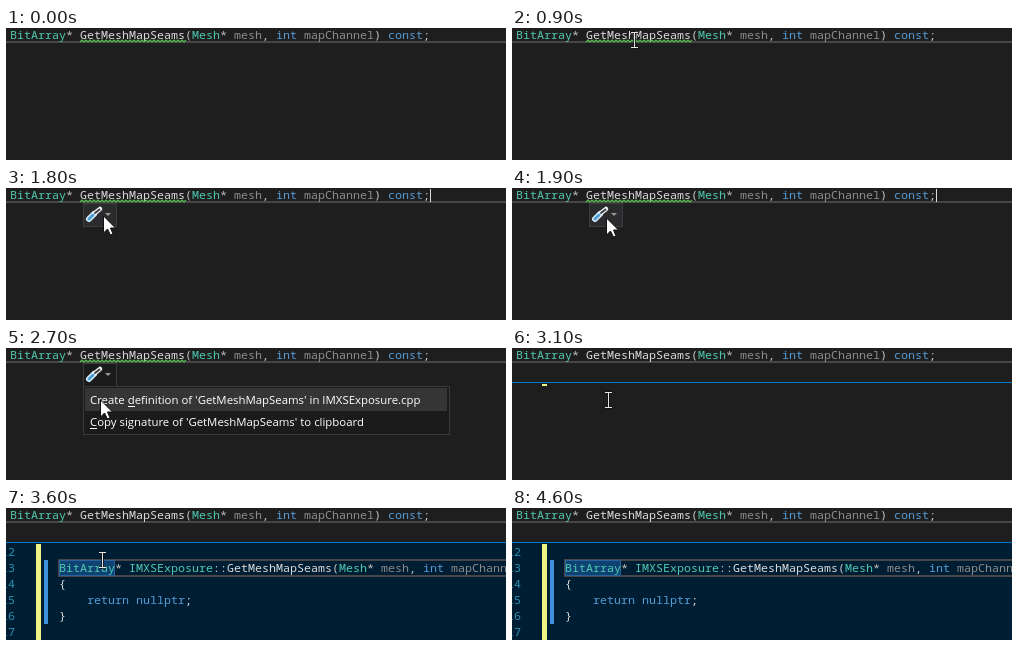
An HTML page with a canvas for the animation above (4.8 s loop, 500 by 132 pixels).

```html
<!DOCTYPE html>
<html lang="en">
<head>
<meta charset="utf-8">
<title>Create definition</title>
<style>
  html, body { margin: 0; width: 100%; height: 100%; overflow: hidden; background: #1e1e1e; }
  canvas { display: block; }
</style>
</head>
<body>
<canvas id="stage" width="500" height="132"></canvas>
<script>
const ctx = document.getElementById('stage').getContext('2d');
const LOOP = 4800, STEP = 100, CHAR = 7;
const CODE = '11.667px "Noto Sans Mono", "DejaVu Sans Mono", monospace';
const UI = '11.4px "Open Sans", "Noto Sans", sans-serif';
const C = {
  bg: '#1e1e1e', peek: '#001e33', type: '#4ec9b0', key: '#569cd6', name: '#dcdcdc',
  param: '#8c8c8c', punct: '#c4c4c4', border: '#464646', link: '#0097fb', text: '#ffffff',
  blue: '#007acc', yellow: '#eff284', number: '#2b91af', green: '#57c04f'
};

const SIGNATURE = [
  ['GetMeshMapSeams', C.name], ['(', C.punct], ['Mesh', C.type], ['* ', C.punct],
  ['mesh', C.param], [', ', C.punct], ['int ', C.key], ['mapChannel', C.param],
  [') ', C.punct], ['const', C.key], [';', C.punct]
];
const DECLARATION = [['BitArray', C.type], ['* ', C.punct], ...SIGNATURE];
const DEFINITION = [
  ['BitArray', C.type], ['* ', C.punct], ['IMXSExposure', C.type], ['::', C.punct], ...SIGNATURE
];
const TIP_TITLE = [
  ['BitArray ', C.type], ['*', C.punct], ['IMXSExposure', C.type], ['::', C.punct],
  ['GetMeshMapSeams', C.name], ['(', C.punct], ['Mesh ', C.type], ['*', C.punct],
  ['mesh', C.param], [', ', C.punct], ['int ', C.key], ['mapChannel', C.param]
];

const lerp = (a, b, p) => a + (b - a) * p;
const clamp = v => Math.min(1, Math.max(0, v));
const smooth = p => p * p * (3 - 2 * p);
const within = (t, a, b) => t >= a && t < b;

function rect(x, y, w, h, color) {
  ctx.fillStyle = color;
  ctx.fillRect(x, y, w, h);
}

function frame(x, y, w, h, fill, line, size = 1) {
  rect(x, y, w, h, line);
  rect(x + size, y + size, w - 2 * size, h - 2 * size, fill);
}

function stroke(points, color, width) {
  ctx.beginPath();
  points.forEach(([x, y]) => ctx.lineTo(x, y));
  ctx.strokeStyle = color;
  ctx.lineWidth = width;
  ctx.stroke();
}

function polygon(points, color) {
  ctx.beginPath();
  points.forEach(([x, y]) => ctx.lineTo(x, y));
  ctx.closePath();
  ctx.fillStyle = color;
  ctx.fill();
}

function code(tokens, x, y) {
  ctx.font = CODE;
  for (const [str, color] of tokens) {
    ctx.fillStyle = color;
    ctx.fillText(str, x, y);
    x += str.length * CHAR;
  }
}

function label(tokens, x, y) {
  ctx.font = UI;
  for (const [str, color] of tokens) {
    ctx.fillStyle = color;
    ctx.fillText(str, x, y);
    x += ctx.measureText(str).width;
  }
}

function squiggle(x1, x2, y) {
  const points = [];
  for (let x = x1, up = 0; x <= x2; x += 2, up ^= 1) points.push([x, y - up * 2]);
  stroke(points, C.green, 1.2);
}

function editor(t) {
  rect(0, 0, 500, 132, C.bg);
  rect(0, 13, 500, 2, C.border);
  code(DECLARATION, 4, 11);
  if (t < 3000) squiggle(74, 180, 14);
  if (within(t, 400, 900) || within(t, 1500, 2000)) rect(424, 1, 1, 13, '#dcdcdc');
}

function quickAction(open) {
  frame(77, 15, 34, 24, open ? '#1b1b1c' : '#2b2b2d', '#3c3c40');
  ctx.lineCap = 'round';
  stroke([[83, 31], [88, 26]], '#d9ecfb', 6);
  stroke([[89, 25], [94, 21]], '#f1f1f1', 4.5);
  stroke([[83, 31], [87, 27]], '#4f9fd8', 3);
  stroke([[89, 25], [93.5, 21.5]], '#3b4248', 2);
  ctx.lineCap = 'butt';
  polygon([[99, 25], [105, 25], [102, 28]], '#999999');
}

function cube(x, y) {
  const hex = [[0, -6], [5, -3], [5, 3], [0, 6], [-5, 3], [-5, -3], [0, -6]];
  const at = list => list.map(([a, b]) => [x + a, y + b]);
  stroke(at(hex), '#b180d7', 1.2);
  stroke(at([[-5, -3], [0, 0], [5, -3]]), '#b180d7', 1.2);
  stroke(at([[0, 0], [0, 6]]), '#b180d7', 1.2);
}

function tooltip() {
  frame(120, 15, 390, 113, '#424245', '#4d4d50');
  cube(139, 31);
  label(TIP_TITLE, 153, 35);
  label([['Search Online', C.link]], 133, 65);
  label([["Function definition for 'GetMeshMapSeams' not found.", C.text]], 133, 92);
  label([['Show potential fixes', C.link], [' (Alt+Enter or Ctrl+.)', C.text]], 133, 119);
}

function menuItem(before, hot, after, y) {
  label([[before + hot + after, C.text]], 84, y);
  const x = 84 + ctx.measureText(before).width;
  rect(Math.round(x), y + 2, Math.round(ctx.measureText(hot).width), 1, C.text);
}

function menu() {
  frame(77, 38, 367, 49, '#1b1b1c', '#3a3a3e');
  rect(79, 40, 362, 23, '#353536');
  menuItem('Create ', 'd', "efinition of 'GetMeshMapSeams' in IMXSExposure.cpp", 56);
  menuItem('', 'C', "opy signature of 'GetMeshMapSeams' to clipboard", 78);
}

function peek(t) {
  rect(0, 34, 500, 1, C.blue);
  if (t < 3200) {
    rect(30, 36, 5, 2, C.yellow);
    return;
  }
  rect(0, 35, 500, 97, C.peek);
  for (let i = 0; i < 6; i++) code([[String(12 + i), C.number]], -5, 48 + i * 16);
  rect(30, 36, 5, 96, C.yellow);
  rect(38, 52, 4, 64, '#3d94dc');
  if (t >= 3400) {
    frame(52, 51, 460, 18, C.peek, C.border, 2);
    frame(53, 52, 56, 16, '#0e4272', '#2a639a');
  }
  code(DEFINITION, 53, 64);
  code([['{', C.name]], 53, 80);
  code([['return nullptr', C.key], [';', C.name]], 81, 96);
  code([['}', C.name]], 53, 112);
  if (within(t, 3400, 3600) || within(t, 4100, 4600)) rect(53, 52, 1, 15, '#dcdcdc');
}

function beam(x, y) {
  x = Math.round(x) + 0.5;
  y = Math.round(y);
  const draw = (color, width) => {
    stroke([[x, y - 7], [x, y + 7]], color, width);
    for (const end of [-7.5, 7.5]) stroke([[x - 3.5, y + end], [x + 3.5, y + end]], color, width);
  };
  draw('#111111', 2.4);
  draw('#e6e6e6', 1);
}

function arrow(x, y) {
  const shape = [[0, 0], [0, 17], [4, 13], [7, 19], [9.5, 18], [7, 12], [12, 12]]
    .map(([a, b]) => [Math.round(x) + a + 0.5, Math.round(y) + b]);
  polygon(shape, '#ffffff');
  stroke([...shape, shape[0]], '#111111', 1);
}

function pointer(t) {
  if (within(t, 400, 1500)) {
    const p = smooth(clamp((t - 400) / 500));
    beam(lerp(441, 122, p), lerp(14, 12, p));
  } else if (within(t, 1500, 3000)) {
    const p = smooth(clamp((t - 1400) / 500));
    const x = lerp(122, 94, p);
    const y = lerp(12, 30, p) + 22 * smooth(clamp((t - 2400) / 300));
    if (x < 111 && y > 16) arrow(x, y);
    else beam(x, y);
  } else if (within(t, 3000, 4100)) {
    beam(96, 52);
  } else if (within(t, 4100, 4200)) {
    beam(147, 51);
  }
}

function render(t) {
  const menuOpen = within(t, 2000, 3000);
  editor(t);
  if (within(t, 1100, 3000)) quickAction(menuOpen);
  if (within(t, 1100, 1500)) tooltip();
  if (menuOpen) menu();
  if (t >= 3100) peek(t);
  pointer(t);
}

const start = performance.now();
function tick() {
  const t = (performance.now() - start) % LOOP;
  render(Math.floor(t / STEP) * STEP);
  requestAnimationFrame(tick);
}
tick();
</script>
</body>
</html>
```
